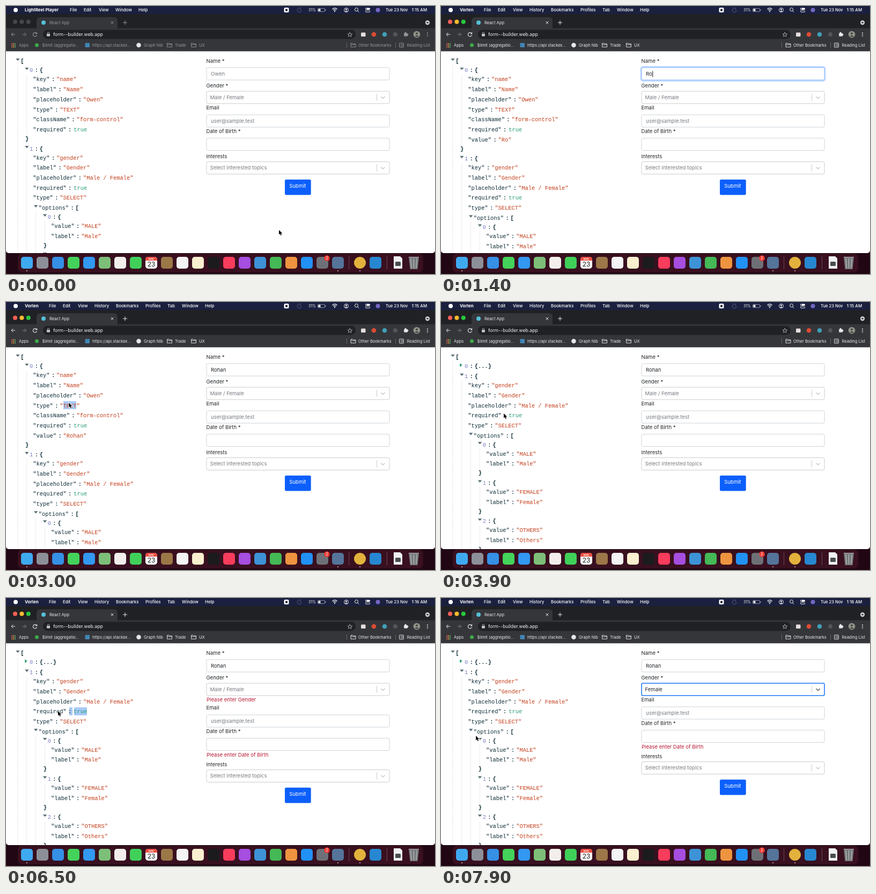
These frames come from a looping animation (800x500 px, 8 s). An HTML page with a canvas:

```html
<!DOCTYPE html>
<html lang="en">
<head>
<meta charset="utf-8">
<title>Form builder demo</title>
<style>
html, body { margin: 0; width: 100%; height: 100%; overflow: hidden; background: #210713; }
canvas { display: block; }
</style>
</head>
<body>
<canvas id="stage" width="800" height="500"></canvas>
<script>
const ctx = document.getElementById('stage').getContext('2d');
const SANS = 'Inter, "Open Sans", sans-serif';
const MONO = '"Liberation Mono", "Courier New", monospace';
const LOOP = 8000, STEP = 100;
const NAME = 'Rohan';

// ---- drawing helpers ----
function text(str, x, y, size, color, weight = 400, font = SANS) {
  ctx.font = `${weight} ${size}px ${font}`;
  ctx.fillStyle = color;
  ctx.fillText(str, x, y + size * 0.36);
}
function box(x, y, w, h, r, fill, stroke, lw = 1) {
  ctx.beginPath();
  ctx.roundRect(x, y, w, h, r);
  if (fill) { ctx.fillStyle = fill; ctx.fill(); }
  if (stroke) { ctx.strokeStyle = stroke; ctx.lineWidth = lw; ctx.stroke(); }
}
function dot(x, y, r, fill) {
  box(x - r, y - r, 2 * r, 2 * r, r, fill);
}
function line(d, color, w = 1) {
  ctx.strokeStyle = color;
  ctx.lineWidth = w;
  ctx.stroke(new Path2D(d));
}
function shape(d, color) {
  ctx.fillStyle = color;
  ctx.fill(new Path2D(d));
}

// ---- timeline ----
const T = {
  focus: 800, blur: 2900, collapse: 3500, minute: 4300, star: 4900, submit: 5900,
  drag: 6400, open: 7000, pick: 7400
};
const typedAt = [1200, 1400, 1600, 1700, 1900];
const hidden = [1100, 2300];
const track = [
  [0, 509, 418], [200, 509, 418], [700, 432, 126], [2300, 432, 128], [2800, 117, 188],
  [3100, 117, 188], [3450, 40, 117], [3550, 40, 117], [3900, 117, 208], [4400, 112, 208],
  [4800, 416, 149], [5000, 408, 149], [5200, 388, 170], [5450, 392, 172],
  [5800, 543, 337], [5950, 543, 337], [6350, 150, 211], [6500, 97, 211], [6650, 97, 211],
  [6950, 520, 171], [7050, 520, 171], [7350, 470, 228], [7450, 470, 228], [7900, 65, 257], [8000, 65, 257]
];
function pointerAt(t) {
  const i = Math.max(1, track.findIndex(k => k[0] > t));
  const [t0, x0, y0] = track[i - 1], [t1, x1, y1] = track[i];
  const u = (t - t0) / (t1 - t0), e = u * u * (3 - 2 * u);
  return [x0 + (x1 - x0) * e, y0 + (y1 - y0) * e];
}

// ---- menu bar ----
function menuBar(t, active) {
  box(0, 0, 800, 15, 0, '#1b203f');
  dot(18, 7.5, 4, '#fff');
  text(active ? 'Vorlen' : 'LightReel Player', 35, 7.5, 8, '#fff', 700);
  const items = active
    ? { File: 80, Edit: 106, View: 134, History: 165, Bookmarks: 205, Profiles: 260, Tab: 301, Window: 328, Help: 371 }
    : { File: 119, Edit: 145, View: 173, Window: 204, Help: 247 };
  for (const name in items) text(name, items[name], 7.5, 7.9, '#fff', 500);

  box(518.5, 3, 9, 9, 2, '#fff');
  box(521, 5.5, 4, 4, 1, '#1b203f');
  line('M549 4 A4 4 0 1 0 551 9 A4 4 0 0 1 549 4', '#59608a');
  text('31%', 564, 7.5, 6.9, '#fff');
  box(581.5, 4.5, 13, 6, 1.5, null, '#aab', 0.8);
  box(582.5, 5.5, 4, 4, 0.5, '#fff');
  box(595.3, 6.2, 1.2, 2.6, 0.5, '#aab');
  line('M608.5 6 Q613 1.8 617.5 6 M610.3 8 Q613 5.6 615.7 8', '#fff', 1.2);
  dot(613, 9.9, 1.1, '#fff');
  box(630.5, 3.5, 8, 8, 4, null, '#fff', 0.9);
  dot(634.5, 6.4, 1.4, '#fff');
  shape('M632 10.4 Q634.5 7 637 10.4 Z', '#fff');
  box(650.5, 3.5, 6, 6, 3, null, '#fff');
  line('M655.5 8.8 L658 11.4', '#fff');
  box(670, 3.5, 9, 3.5, 1.7, '#fff');
  box(670.4, 8.4, 8.2, 3, 1.5, null, '#fff', 0.8);
  dot(672, 5.2, 1, '#1b203f');
  dot(693.5, 7.5, 4, '#7467c4');
  text('Tue 23 Nov', 708, 7.5, 7.6, '#fff', 500);
  text(t < T.minute ? '1:15 AM' : '1:16 AM', 756.5, 7.5, 7.9, '#fff', 500);
}

// ---- browser window frame ----
function folder(x, c) {
  line(`M${x - 4.5} 69.5 h3.5 l1 1.2 h4.5 v5.8 h-9 z M${x - 4.5} 72 h9`, c, 0.9);
}
function browser(active) {
  const ui = active ? '#e8eaed' : '#93979c';
  box(0, 15, 800, 27, 0, '#202124');
  ['#ff5f57', '#febc2e', '#28c840'].forEach((c, i) => dot(17 + 12.4 * i, 29.5, 4, active ? c : '#46474b'));
  box(0, 41.5, 800, 43, 0, '#35363a');
  box(57, 21, 151, 22, [6, 6, 0, 0], '#35363a');
  dot(70, 31, 4, '#55bfd8');
  text('React App', 81, 31, 7.6, ui);
  line('M195.7 28.7 l4.6 4.6 m0 -4.6 l-4.6 4.6 M218 31 h8 m-4 -4 v8', ui);
  dot(786, 31, 4.2, '#c5c8cc');
  shape('M783.8 30 h4.4 l-2.2 2.8 z', '#202124');

  line('M17 53 h-7 m3.2 -3.3 l-3.3 3.3 l3.3 3.3', ui);
  line('M30.5 53 h7 m-3.2 -3.3 l3.3 3.3 l-3.3 3.3', '#7d8185');
  line('M57 51.2 A3.6 3.6 0 1 0 57.5 54.2', ui, 1.1);
  shape('M58.2 48.8 v3.4 h-3.4 z', ui);
  box(69, 44.5, 583, 17, 8.5, '#202124');
  box(76, 52, 6, 4.6, 0.8, '#c4c7cb');
  line('M77.3 52 v-1.3 a1.7 1.7 0 0 1 3.4 0 V52', '#c4c7cb', 0.9);
  text('form--builder.web.app', 88, 53, 8.7, '#f1f3f4');
  line('M641.3 49 l1.2 2.9 3.1 .3 -2.4 2 .8 3 -2.7 -1.7 -2.7 1.7 .8 -3 -2.4 -2 3.1 -.3 z', '#c9ccd0', 0.8);
  box(662, 49.5, 8.5, 7.5, 1.5, '#e4dede');
  dot(686, 53, 4.3, '#dd4c33');
  dot(706, 53, 4.3, '#3f9fb8');
  dot(726, 53, 4, '#52555a');
  box(742.2, 50.5, 6.6, 6, 1, ui);
  dot(745, 50, 1.4, ui);
  dot(749, 53.5, 1.4, ui);
  dot(766, 53, 6.3, '#8f948b');
  dot(766, 51.3, 2, '#474a46');
  shape('M762 57.5 Q766 51.5 770 57.5 Z', '#474a46');
  for (const y of [50, 53, 56]) dot(786, y, 0.9, ui);

  const hues = ['#e06055', '#e0a040', '#5fa96b'];
  for (let i = 0; i < 9; i++) box(10 + 3 * (i % 3), 69.5 + 3 * (i / 3 | 0), 2, 2, 0.4, hues[i % 3]);
  const mark = (str, x) => text(str, x, 73, 7.5, ui);
  mark('Apps', 24);
  dot(57.5, 73, 3.6, '#3fa84a');
  mark('$limit (aggregatio...', 67.5);
  box(147.5, 69, 8.5, 8, 1, '#3f86b5');
  mark('https://api.stackex...', 161);
  dot(247.5, 73, 4.3, '#e6e6e6');
  mark('Graph Nib', 257);
  folder(305, ui);
  mark('Trade', 315);
  folder(350, ui);
  mark('UX', 360);
  line('M635.5 68 v10 M726.5 68 v10', '#5f6368');
  folder(647.5, ui);
  mark('Other Bookmarks', 657);
  box(733.5, 69, 8, 8, 0.8, null, ui, 0.9);
  line('M735.2 71.3 h1 m1 0 h3 M735.2 73 h1 m1 0 h3 M735.2 74.8 h1 m1 0 h3', ui, 0.8);
  mark('Reading List', 747.5);
}

// ---- JSON tree ----
const INDENT = 16.85, CHAR = 0.6001 * 10.4;
const leaf = (level, key, value) => ({ level, key: `"${key}"`, value, kind: 'leaf' });
const open = (level, key, value) => ({ level, key, value, kind: 'open' });
const close = level => ({ level, key: '}', kind: 'close' });

function treeRows(collapsed, name) {
  const rows = [open(0, '[')];
  if (collapsed) rows.push({ level: 1, key: '0', value: '{...}', kind: 'shut' });
  else {
    rows.push(open(1, '0', '{'), leaf(2, 'key', '"name"'), leaf(2, 'label', '"Name"'),
      leaf(2, 'placeholder', '"Owen"'), leaf(2, 'type', '"TEXT"'),
      leaf(2, 'className', '"form-control"'), leaf(2, 'required', 'true'));
    if (name) rows.push(leaf(2, 'value', `"${name}"`));
    rows.push(close(1));
  }
  rows.push(open(1, '1', '{'), leaf(2, 'key', '"gender"'), leaf(2, 'label', '"Gender"'),
    leaf(2, 'placeholder', '"Male / Female"'), leaf(2, 'required', 'true'),
    leaf(2, 'type', '"SELECT"'), open(2, '"options"', '['));
  ['Male', 'Female', 'Others'].forEach((s, i) => rows.push(open(3, String(i), '{'),
    leaf(4, 'value', `"${s.toUpperCase()}"`), leaf(4, 'label', `"${s}"`), close(3)));
  return rows;
}

function tree(rows) {
  const dark = '#0b2b36';
  const mono = (s, x, y, color, weight) => text(s, x, y, 10.4, color, weight, MONO);
  let y = 102.7, prev;
  for (const row of rows) {
    const { level, key, value, kind } = row, dx = level * INDENT;
    if (prev) y += prev === 'open' || kind === 'close' ? 17 : 18.7;
    prev = kind;
    for (let l = 0; l < level; l++) box(21.3 + l * INDENT, y - 9, 1, 18.8, 0, '#ebebeb');
    if (kind === 'close') { mono(key, 19.15 + dx, y, dark, 700); continue; }
    if (kind === 'open') shape(`M${18.3 + dx} ${y - 4.8} h7.4 l-3.7 4.4 z`, '#586e75');
    if (kind === 'shut') shape(`M${18.4 + dx} ${y - 5.5} v7 l4.4 -3.5 z`, '#2a9a70');
    const x = (kind === 'leaf' ? 16.6 : 27.15) + dx, end = x + key.length * CHAR;
    const index = /^\d/.test(key);
    mono(key, x, y, index ? '#7d80c4' : dark, key === '[' ? 700 : 400);
    if (!value) continue;
    mono(':', end + 3.4, y, dark, 700);
    if (kind !== 'leaf') mono(value, end + 12.5, y, dark, 700);
    else if (value === 'true') mono(value, end + 13.5, y, '#2c9d78');
    else mono(value, end + 12.5, y, '#c4401d');
  }
}

// ---- form ----
const INK = '#212529', HINT = '#767b80', SIZE = 9.55;
const say = (str, x, y, color = INK) => text(str, x, y, SIZE, color);

function input(y, str, color, focused) {
  if (focused) box(373, y - 1, 343, 26, 4, null, '#c2daff', 3);
  box(374, y + 0.5, 341, 23, 2.5, '#fff', focused ? '#86b7fe' : '#ced4da');
  say(str, 382, y + 12, color);
}
function select(y, str, color, border, focused) {
  box(374, y + 0.5, 341, 23, 2.5, '#fff', focused ? '#1f76f2' : border, focused ? 1.6 : 1);
  say(str, 380.5, y + 12, color);
  line(`M691.5 ${y + 5.5} v13`, '#ccc');
  line(`M699.5 ${y + 10.5} l3.5 3.5 l3.5 -3.5`, focused ? '#555' : '#c8c8c8', 1.4);
}
function form(t, typed, pointer) {
  const focused = t >= T.focus && t < T.blur;
  const picked = t >= T.pick, sent = t >= T.submit;
  const error = (str, y) => say(str, 374, y, '#b8182f');
  say('Name *', 373.5, 103);
  input(114.5, typed || 'Owen', typed ? INK : HINT, focused);
  if (focused) {
    ctx.font = `400 ${SIZE}px ${SANS}`;
    box(382.5 + ctx.measureText(typed).width, 121.5, 1, 11, 0, '#111');
  }
  say('Gender *', 373.5, 149);
  const hover = pointer[0] > 374 && pointer[0] < 715 && pointer[1] > 159 && pointer[1] < 182;
  select(158.5, picked ? 'Female' : 'Male / Female', picked ? INK : HINT, hover ? '#aaa' : '#ccc', t >= T.open);

  let dy = 0;
  if (sent && !picked) { error('Please enter Gender', 190); dy += 15; }
  say('Email', 373.5, 190 + dy);
  input(202.5 + dy, 'user@sample.test', HINT);
  say('Date of Birth *', 373.5, 234 + dy);
  input(246 + dy, '', INK);
  if (sent) { error('Please enter Date of Birth', 278 + dy); dy += 15; }
  say('Interests', 373.5, 280.5 + dy);
  select(290 + dy, 'Select interested topics', HINT, '#ccc');
  box(520, 323.8 + dy, 48.7, 28.7, 2.5, '#0c5ffb');
  say('Submit', 528.3, 336 + dy, '#fff');

  if (t >= T.open && !picked) {
    box(374, 187.5, 341, 74, 2.5, '#fff', '#ddd');
    ['Male', 'Female', 'Others'].forEach((s, i) => {
      const y = 190 + 23 * i;
      if (i === (pointer[1] > 213 ? 1 : 0)) box(374.5, y, 340, 23, 0, '#deebff');
      say(s, 381.5, y + 11.5);
    });
  }
}

function selection(t) {
  const mark = (x, y, w) => box(x, y, w, 15, 0, '#a9caf7');
  if (t >= T.blur && t < T.collapse) mark(107, 185, 24);
  if (t >= T.star && t < T.drag) mark(409.5, 141, 5);
  if (t >= T.drag && t < T.open) { mark(118, 204, 6); mark(127, 204, 24); }
}

// ---- dock ----
const apps = ('#3fa9f0 #8d8f98 #3590e6 #43d35a #3298f2 #7dbf78 #f1eeec #40d05a #fafafa #9c7748 #f4f4f4 ' +
  '#faf0cf #1b1b1d #f83c5c #a64ee0 #3d93d6 #45b956 #ee9440 #2191f4 #6d7076 #55749a').split(' ');
function dock() {
  box(22, 462, 756, 35, 8, '#38101f');
  const icon = (x, c) => box(x - 11, 468, 22, 22, 5, c);
  apps.forEach((c, i) => icon(39 + 29 * i, c));
  box(260, 468, 22, 7, [5, 5, 0, 0], '#ee4b40');
  ctx.textAlign = 'center';
  text('NOV', 271, 472, 4.6, '#fff', 600);
  text('23', 271, 482, 12, '#222');
  dot(598.5, 470.5, 5.3, '#f23b35');
  text('2', 598.5, 470.5, 7, '#fff');
  ctx.textAlign = 'left';
  line('M639.5 467 v24 M710.5 467 v24', '#6d4652');
  dot(660, 479, 11, '#e3b23c');
  icon(689, '#2787d0');
  shape('M723 467 h12 l4 4 v19 h-16 z', '#f1f1f1');
  box(726, 477, 10, 8, 1.5, '#4a4c50');
  shape('M751 468 h19 l-2.5 23 h-14 z', '#777a7d');
  line('M751 468.5 h19 M755 471 l1 18 M760.5 471 v18 M766 471 l-1 18', '#b9bcbe', 1.2);
  for (const x of [39, 619, 660]) dot(x, 494, 1, '#d8c8cd');
}

function arrow(x, y) {
  const d = `M${x} ${y} v8.6 l2 -1.8 l1.4 3.2 l1.6 -.7 l-1.4 -3.1 h2.7 z`;
  line(d, '#fff', 1.6);
  shape(d, '#000');
}

function draw(t) {
  const active = t >= T.focus;
  const typed = NAME.slice(0, typedAt.filter(k => k <= t).length);
  const pointer = pointerAt(t);
  box(0, 0, 800, 500, 0, '#210713');
  box(0, 84, 800, 377, [0, 0, 5, 5], '#fff');
  ctx.save();
  ctx.beginPath();
  ctx.roundRect(0, 84, 800, 377, [0, 0, 5, 5]);
  ctx.clip();
  selection(t);
  tree(treeRows(t >= T.collapse, typed));
  form(t, typed, pointer);
  ctx.restore();
  browser(active);
  menuBar(t, active);
  dock();
  if (t < hidden[0] || t >= hidden[1]) arrow(...pointer);
}

const start = performance.now();
function tick() {
  const t = (performance.now() - start) % LOOP;
  draw(Math.floor(t / STEP) * STEP);
  requestAnimationFrame(tick);
}
tick();
</script>
</body>
</html>
```
